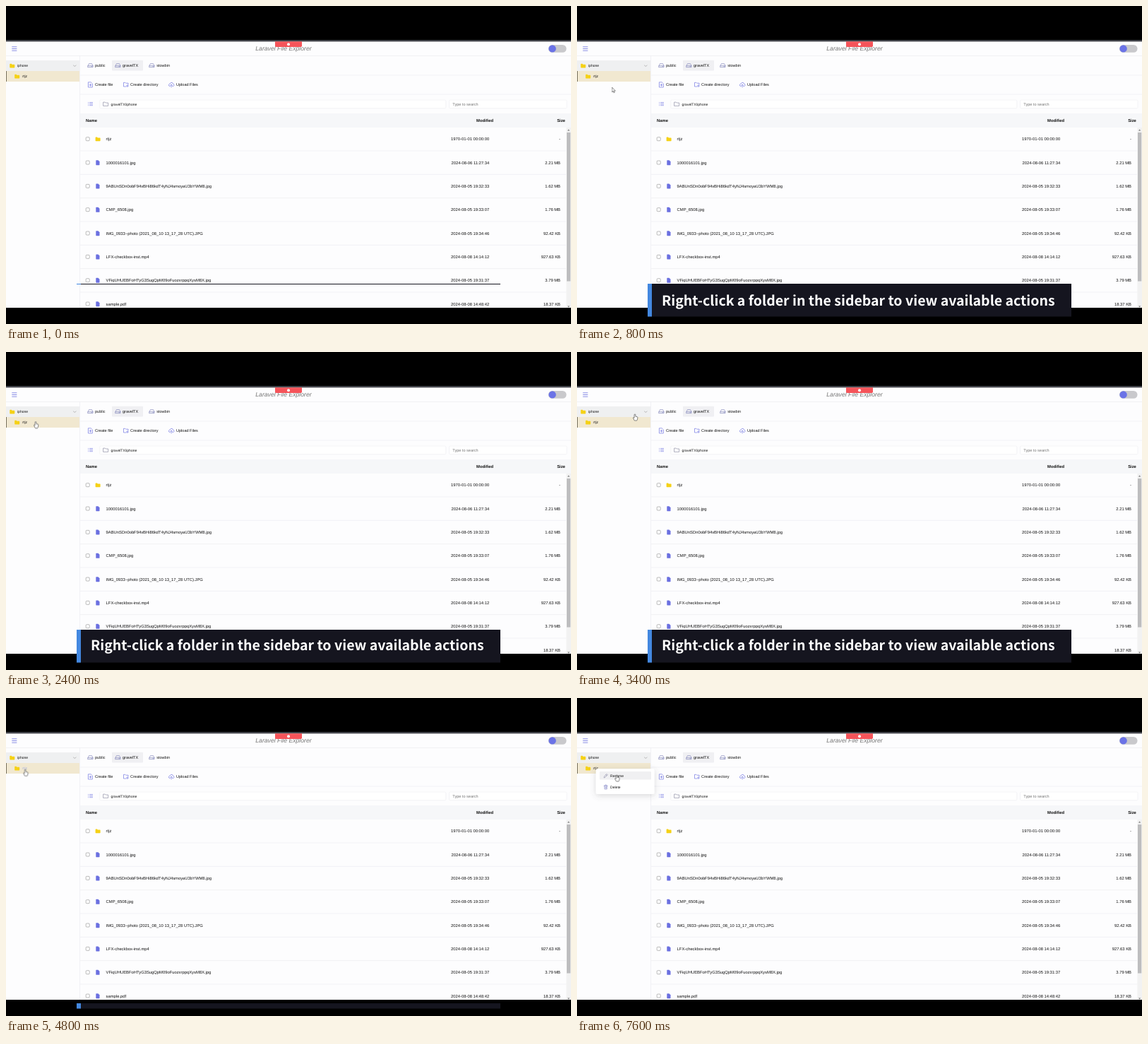
Recreate the animation shown at these times as an HTML page. Size 800 by 450 pixels, loop 8000 ms.

```html
<!DOCTYPE html>
<html lang="en">
<head>
<meta charset="utf-8">
<title>File explorer</title>
<style>
  html, body { margin: 0; width: 100%; height: 100%; overflow: hidden; background: #000; }
  svg { display: block; }
  text { font-family: "Liberation Sans", Arial, sans-serif; font-size: 5.833px; fill: #111; text-rendering: geometricPrecision; }
  .button { font-size: 5.556px; }
  .small { font-size: 5.05px; }
  .bold { font-weight: bold; }
  .end { text-anchor: end; }
  .line { fill: none; stroke: #6b70e0; stroke-width: .65; stroke-linejoin: round; stroke-linecap: round; }
  .rule { stroke: #e9eaee; stroke-width: .6; }
  .field { fill: #fff; stroke: #e8e8ec; stroke-width: .5; }

  .anim { animation: 8s linear infinite paused; }
  #pointer { animation-name: move; }
  #arrow { animation-name: arrow; animation-timing-function: step-end; }
  #hand { animation-name: hand; animation-timing-function: step-end; }
  #menu { animation-name: menu; animation-timing-function: step-end; }
  #renameHover { animation-name: rename; animation-timing-function: step-end; }
  #deleteHover { animation-name: delete; animation-timing-function: step-end; }
  #picked { animation-name: pick; animation-timing-function: step-end; }
  #caption { position: absolute; left: 99.5px; top: 393px; width: 600.5px; height: 46.5px; animation-name: reveal; animation-timing-function: cubic-bezier(.45, 0, .55, 1); }
  #captionText { animation-name: rise; animation-timing-function: cubic-bezier(.45, 0, .55, 1);
    font: bold 19.5px "Noto Sans CJK SC", "Noto Sans CJK JP", "Noto Sans CJK", "Noto Sans", sans-serif; fill: #fff; }

  @keyframes move {
    0%, 2.5% { transform: translate(74px, 150px); }
    10% { transform: translate(49.5px, 115px); }
    15% { transform: translate(45px, 109px); }
    22.5%, 28% { transform: translate(38px, 99px); }
    30% { transform: translate(42px, 98.5px); }
    42.5% { transform: translate(82px, 88px); }
    50% { transform: translate(97.5px, 84px); }
    60%, 63% { transform: translate(27.3px, 101.3px); }
    69% { transform: translate(49px, 110px); }
    77.5%, 88% { transform: translate(52.3px, 125.5px); }
    95%, 100% { transform: translate(56.3px, 109px); }
  }
  @keyframes arrow { 0% { opacity: 0; } 2.5% { opacity: 1; } 17.5%, 100% { opacity: 0; } }
  @keyframes hand { 0% { opacity: 0; } 17.5%, 100% { opacity: 1; } }
  @keyframes menu { 0% { opacity: 0; } 62.5%, 100% { opacity: 1; } }
  @keyframes rename { 0% { opacity: 0; } 65% { opacity: 1; } 72.5% { opacity: 0; } 92.5%, 100% { opacity: 1; } }
  @keyframes delete { 0% { opacity: 0; } 72.5% { opacity: 1; } 92.5%, 100% { opacity: 0; } }
  @keyframes pick { 0% { fill: #111; } 60% { fill: #a3aee0; } 62.5%, 100% { fill: #111; } }
  @keyframes reveal {
    0% { clip-path: inset(0 0 46.1px 0); }
    10.6%, 51.875% { clip-path: inset(0 0 0 0); }
    63.125%, 100% { clip-path: inset(46.5px 0 0 0); }
  }
  @keyframes rise {
    0%, .6% { transform: translateY(46px); }
    11.875%, 50.625% { transform: none; }
    61.875%, 100% { transform: translateY(46px); }
  }
</style>
</head>
<body>
<svg width="800" height="450" viewBox="0 0 800 450">
  <defs>
    <path id="folder" d="M0 .7Q0 0 .7 0H2.4L3.3 .9H6.3Q7 .9 7 1.6V5Q7 5.7 6.3 5.7H.7Q0 5.7 0 5Z" fill="#f5d116"/>
    <path id="file" d="M0 .6Q0 0 .6 0H3.2L5.2 2V6.4Q5.2 7 4.6 7H.6Q0 7 0 6.4Z" fill="#6b70e0"/>
    <path id="drive" class="line" d="M0 3.2 1.4.3H5.6L7 3.2V5.2H0ZM0 3.2H7M5 4.2H5.8" style="stroke:#7d80b8"/>
    <path id="outline" class="line" d="M0 .3H2.3L3.2 1.2H6.6V5.6H0Z" style="stroke:#85859c"/>
    <filter id="shadow" x="-30%" y="-50%" width="160%" height="220%">
      <feDropShadow dx="0" dy="2" stdDeviation="4" flood-color="#555" flood-opacity=".22"/>
    </filter>
  </defs>

  <rect width="800" height="450"/>
  <rect y="48" width="800" height="2.5" fill="#41434a"/>
  <rect y="50.3" width="800" height="376.7" fill="#fdfdfe"/>

  <!-- top bar -->
  <path class="rule" d="M0 70.5H800M104.5 70.5V427M105 98H800M105 125H800"/>
  <path class="line" d="M8.7 57.8H15M8.7 60.5H15M8.7 63.2H15" style="stroke-width:.8"/>
  <text x="393" y="63.3" text-anchor="middle" style="font-size:8.67px;font-style:italic;fill:#777">Laravel File Explorer</text>
  <path d="M381 50.3H419V56.2Q419 58 417.2 58H382.8Q381 58 381 56.2Z" fill="#f5545a"/>
  <circle cx="400" cy="54.2" r="2" fill="#fff"/>
  <rect x="768" y="55" width="25.5" height="10.8" rx="5.4" fill="#c9c9cc"/>
  <circle cx="773.6" cy="60.4" r="5.2" fill="#6b73e6"/>

  <!-- sidebar -->
  <rect y="77" width="104" height="15" fill="#eff0f1"/>
  <rect y="92" width="104" height="15" fill="#f1e8d0"/>
  <rect y="92" width="1" height="15" fill="#77715f"/>
  <use href="#folder" x="5.3" y="81.8"/>
  <use href="#folder" x="12.2" y="96.8"/>
  <text class="small" x="16" y="86.3">iphone</text>
  <text class="small anim" id="picked" x="23.3" y="101.3">rtjz</text>
  <path class="line" d="M95.5 84 97.3 85.4 99.1 84" style="stroke:#999"/>

  <!-- disks and tools -->
  <rect x="150" y="76.7" width="44" height="14.8" rx="1" fill="#f0f0f3"/>
  <use href="#drive" x="116" y="81.4"/>
  <use href="#drive" x="155" y="81.4"/>
  <use href="#drive" x="203" y="81.4"/>
  <g class="button">
    <text class="button" x="126" y="86">public</text>
    <text class="button" x="165" y="86">gravelTX</text>
    <text class="button" x="213.2" y="86">stowbin</text>
    <text class="button" x="126" y="113.4">Create file</text>
    <text class="button" x="176" y="113.4">Create directory</text>
    <text class="button" x="241" y="113.4">Upload Files</text>
  </g>
  <path class="line" d="M116.8 107.8H120.2L122.3 109.9V115H116.8ZM119.5 110.3V113.3M118 111.8H121"/>
  <path class="line" d="M170 114H166.5V108.3H168.8L169.7 109.2H173V111M170.5 113H173.5M172 111.5V114.5"/>
  <path class="line" d="M232.3 113.7Q230 113.5 230.4 111.5 230.9 110 232.3 110 233 108 235 108.4 236.6 108.8 236.7 110.5 238.3 110.8 238 112.3 237.6 113.7 235.8 113.7M234.1 115V111.3M232.8 112.4 234.1 111.1 235.4 112.4"/>
  <path class="line" d="M118.5 136.5H122.6M118.5 138.6H122.6M118.5 140.7H122.6M116.5 136.5H116.7M116.5 138.6H116.7M116.5 140.7H116.7"/>
  <rect class="field" x="132.8" y="133" width="490" height="11.8" rx="1.5"/>
  <rect class="field" x="627.5" y="133" width="166.5" height="11.8" rx="1.5"/>
  <use href="#outline" x="138" y="135.8"/>
  <text class="small" x="148.6" y="140.6">gravelTX/iphone</text>
  <text class="button" x="632.3" y="140.7" style="fill:#757575">Type to search</text>

  <!-- table -->
  <rect x="105" y="152" width="695" height="20" fill="#f6f7f9"/>
  <text class="bold" x="113" y="164.2">Name</text>
  <text class="bold end" x="690" y="164.2">Modified</text>
  <text class="bold end" x="791.8" y="164.2">Size</text>
  <g id="rows"></g>
  <rect x="793.3" y="172" width="6.7" height="255" fill="#f2f2f2"/>
  <rect x="794" y="179" width="5.2" height="210.5" fill="#bdbdbf"/>
  <path d="M795 176.5 796.6 174.5 798.2 176.5ZM795 424.5 796.6 426.5 798.2 424.5Z" fill="#777"/>
  <rect y="427" width="800" height="23"/>

  <g id="menu" class="anim">
    <rect x="26.8" y="100" width="82.8" height="36" rx="2.5" fill="#fff" filter="url(#shadow)"/>
    <rect id="renameHover" class="anim" x="32" y="104" width="73" height="11.6" rx="1" fill="#f0f0f2"/>
    <rect id="deleteHover" class="anim" x="32" y="120" width="73" height="11.6" rx="1" fill="#f0f0f2"/>
    <path class="line" d="M38.3 112.5 38.8 110.8 42 107.4 43.3 108.7 40 112ZM41 108.5 42.3 109.8" style="stroke:#8b8ba8"/>
    <path class="line" d="M38.2 124.2H43.2M39.8 124V123H41.6V124M38.8 124.3 39.1 129H42.3L42.6 124.3M40.1 125.6V127.7M41.3 125.6V127.7" style="stroke:#8588c8"/>
    <text class="small" x="47" y="111.7">Rename</text>
    <text class="small" x="47" y="127.7">Delete</text>
  </g>

  <g id="pointer" class="anim" fill="#fff" stroke="#333" stroke-width=".6" stroke-linejoin="round">
    <path id="arrow" class="anim" d="M0 0V6.9L1.6 5.5 2.7 7.8 3.7 7.3 2.7 5.1H4.8Z"/>
    <path id="hand" class="anim" d="M0 0Q.9 0 .9 .9V3.2L3.2 3.7Q4.1 4 3.9 5L3.4 7.8Q3.2 9 2.3 9H-.2Q-.9 9-1.2 8.2L-2.4 5.5Q-2.6 4.4-1.6 4.8L-.9 5.4V.9Q-.9 0 0 0Z"/>
  </g>
</svg>

<div id="caption" class="anim">
  <svg width="600.5" height="46.5">
    <rect width="600.5" height="46.5" fill="#15151f"/>
    <rect width="6" height="46.5" fill="#4388e0"/>
    <text id="captionText" class="anim" x="20" y="28.8">Right-click a folder in the sidebar to view available actions</text>
  </svg>
</div>

<script>
  const files = [
    ["rtjz", "1970-01-01 00:00:00", "-"],
    ["1000016101.jpg", "2024-08-06 11:27:34", "2.21 MB"],
    ["9ABUnSDn0obF94vBHi86kdT4yNJ4smoyaU3bYWM8.jpg", "2024-08-05 19:32:33", "1.62 MB"],
    ["CMP_6508.jpg", "2024-08-05 19:33:07", "1.76 MB"],
    ["IMG_0933~photo (2021_08_10 13_17_28 UTC).JPG", "2024-08-05 19:34:46", "92.42 KB"],
    ["LFX-checkbox-inst.mp4", "2024-08-08 14:14:12", "927.63 KB"],
    ["VFiqUHUEBFoHTyG3SugQpM09oFuozxrppqXysM8X.jpg", "2024-08-05 19:31:37", "3.79 MB"],
    ["sample.pdf", "2024-08-08 14:48:42", "18.37 KB"]
  ];
  document.getElementById("rows").innerHTML = files.map(([name, date, size], i) => {
    const y = 188.2 + i * 100 / 3;
    const icon = i ? `<use href="#file" x="127.3" y="${y - 3.4}"/>` : `<use href="#folder" x="126.6" y="${y - 2.6}"/>`;
    return `<path class="rule" d="M105 ${y + 16.8}H793"/>
      <rect x="113.2" y="${y - 2.5}" width="5" height="5" rx="1" fill="#fff" stroke="#777" stroke-width=".5"/>${icon}
      <text x="141.6" y="${y + 2.1}">${name}</text>
      <text class="end" x="684.2" y="${y + 2.1}">${date}</text>
      <text class="end" x="785" y="${y + 2.1}">${size}</text>`;
  }).join("");

  const LOOP = 8000, STEP = 200;
  const animations = document.getAnimations();
  let start;
  function tick(now) {
    start ??= now;
    const time = Math.floor((now - start) % LOOP / STEP) * STEP;
    for (const animation of animations) animation.currentTime = time;
    requestAnimationFrame(tick);
  }
  requestAnimationFrame(tick);
</script>
</body>
</html>
```
